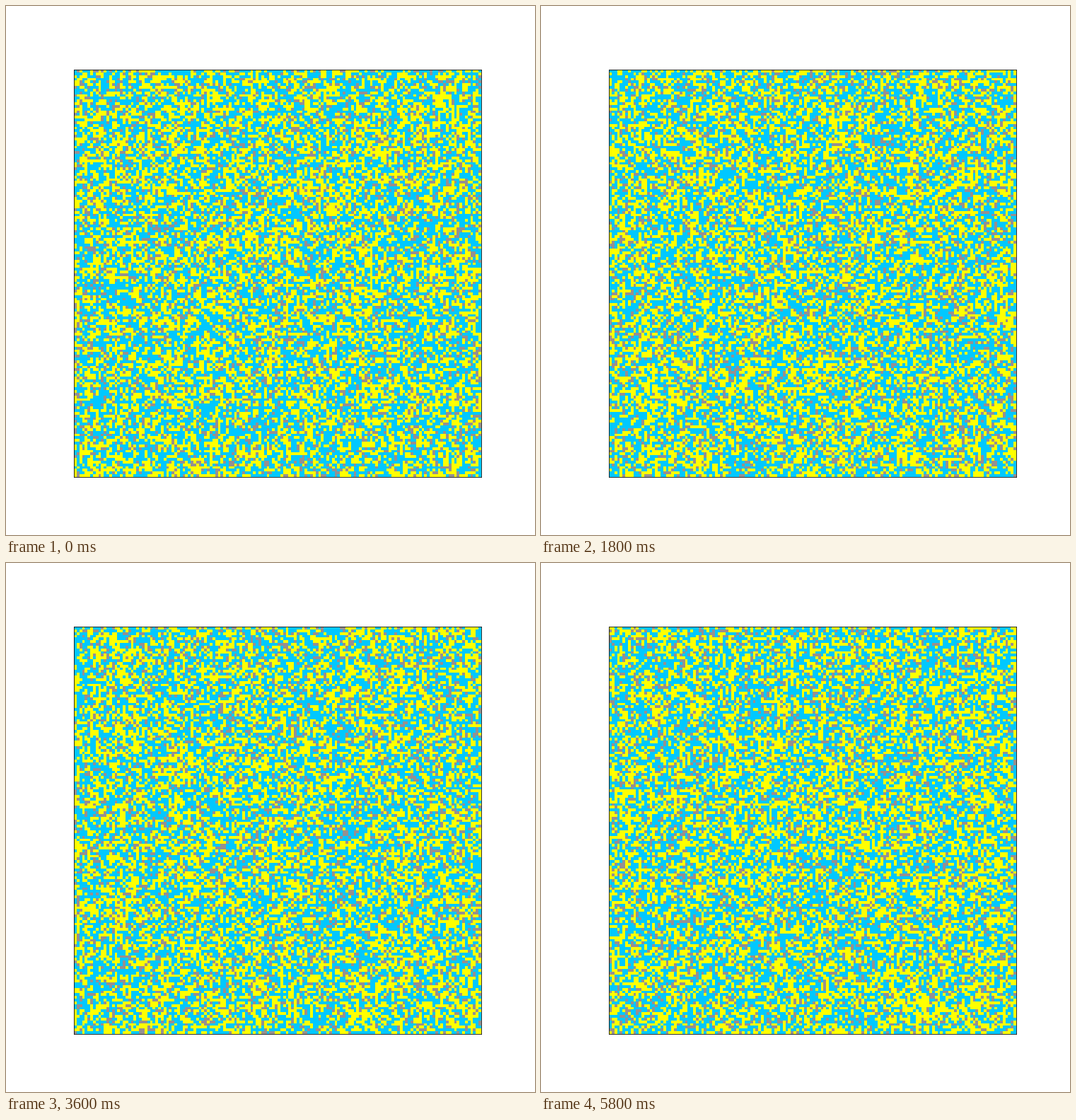
Write a matplotlib script that moves like this. It is 748 px wide and 748 px high and loops after 6000 ms.

```python
import numpy as np
import matplotlib.pyplot as plt
from matplotlib.animation import FuncAnimation
from matplotlib.colors import ListedColormap

STAGE = 748
LEFT, BOTTOM, SIDE = 96, 82, 576
CELLS = 150
FRAMES = 30
STEP_MS = 200
ACTIVE, FADING = 0.54, 0.24
COLORS = ListedColormap(["#00c8ff", "#ffff00", "#969090"])


def neighbours(field):
    """Sum of the four adjacent cells on a wrapped grid."""
    return sum(np.roll(field, s, axis) for axis in (0, 1) for s in (-1, 1))


def grid(step):
    """Idle (0), active (1) and fading (2) cells for one generation."""
    rng = np.random.default_rng(400 + step)
    noise = rng.standard_normal((CELLS, CELLS))
    field = noise + 0.05 * neighbours(noise)
    cells = (field > np.quantile(field, 1 - ACTIVE)).astype(int)
    fading = rng.random(cells.shape) < FADING
    cells[(cells == 1) & fading] = 2
    return cells


def update(frame):
    # The first generation is held for two ticks.
    image.set_data(grid(max(frame, 1)))
    return (image,)


fig = plt.figure(figsize=(8.5, 8.5), dpi=88)
ax = fig.add_axes([LEFT / STAGE, BOTTOM / STAGE, SIDE / STAGE, SIDE / STAGE])
image = ax.imshow(grid(1), cmap=COLORS, vmin=0, vmax=2, interpolation="nearest")
ax.set_xticks([])
ax.set_yticks([])
for spine in ax.spines.values():
    spine.set_linewidth(0.65)

anim = FuncAnimation(fig, update, frames=FRAMES, interval=STEP_MS,
                     repeat=True, repeat_delay=0, blit=False)
plt.show()
```
